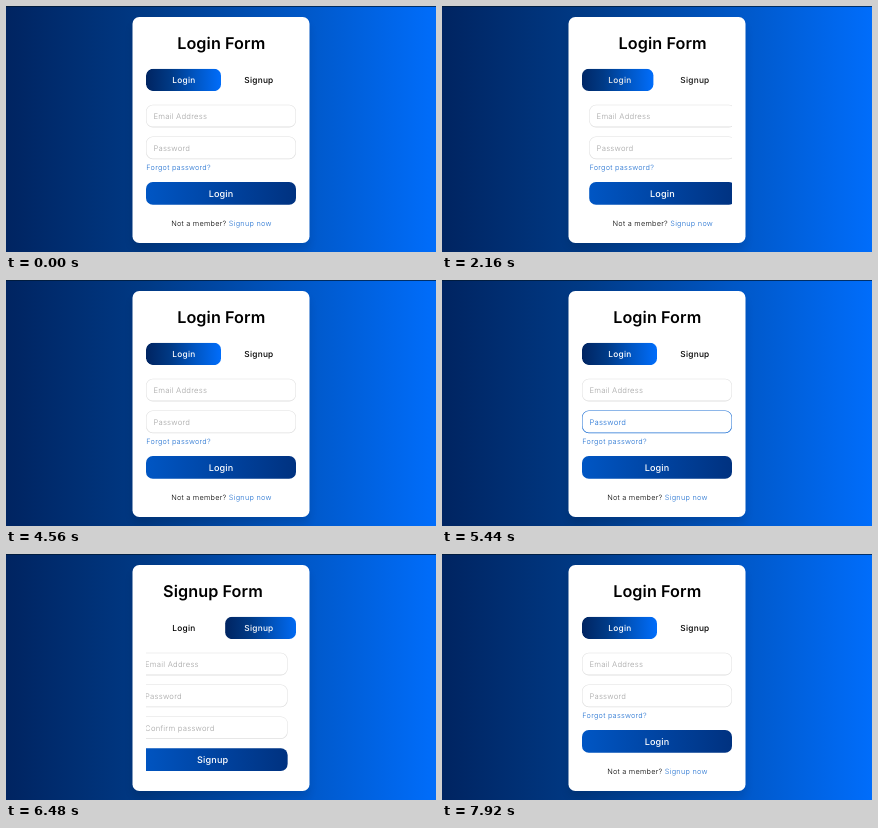
Animation of 430 by 246 pixels, one loop 8 s. Source, as an HTML page:

```html
<!DOCTYPE html>
<html lang="en">
<head>
<meta charset="utf-8">
<title>Login and signup form</title>
<style>
html, body { margin: 0; width: 100%; height: 100%; overflow: hidden; background: #003a86; }
svg { display: block; width: 100vw; height: 100vh; }
text { font-family: Inter, "Open Sans", sans-serif; text-rendering: geometricPrecision; }
.title { font-size: 16.2px; font-weight: 600; letter-spacing: .08px; }
.tab { font-size: 8.3px; font-weight: 500; letter-spacing: .25px; }
.button { font-size: 9.08px; font-weight: 500; letter-spacing: .15px; fill: #fff; }
.hint { font-size: 7.71px; font-weight: 300; letter-spacing: .23px; }
.small { font-size: 7.3px; font-weight: 300; letter-spacing: .26px; }
.link { fill: #1f6fd0; }
.mid { text-anchor: middle; }
</style>
</head>
<body>
<svg id="stage" viewBox="0 0 430 246" preserveAspectRatio="none">
  <defs>
    <linearGradient id="blue">
      <stop offset="0" stop-color="#002461"/>
      <stop offset=".333" stop-color="#003a86"/>
      <stop offset=".667" stop-color="#0056c4"/>
      <stop offset="1" stop-color="#006dfb"/>
    </linearGradient>
    <linearGradient id="deep">
      <stop offset="0" stop-color="#0056c4"/>
      <stop offset="1" stop-color="#003280"/>
    </linearGradient>
    <filter id="soft" x="-20%" y="-20%" width="140%" height="140%"><feGaussianBlur stdDeviation="4.5"/></filter>
    <clipPath id="cardClip"><rect x="126.5" y="11" width="177" height="226" rx="6.8"/></clipPath>
    <clipPath id="tabClip"><rect x="140" y="62.7" width="150" height="22.4" rx="6.8"/></clipPath>
    <clipPath id="formClip"><rect x="140" y="90" width="150" height="140"/></clipPath>
  </defs>
  <rect width="430" height="246" fill="url(#blue)"/>
  <rect width="430" height="1" fill="#00182e" opacity=".7"/>
  <rect x="126.5" y="17.8" width="177" height="226" rx="6.8" opacity=".1" filter="url(#soft)"/>
  <rect x="126.5" y="11" width="177" height="226" rx="6.8" fill="#fff"/>
  <g id="titles" clip-path="url(#cardClip)"></g>
  <g id="tabs" clip-path="url(#tabClip)"></g>
  <g clip-path="url(#formClip)"><g id="forms"></g></g>
</svg>
<script>
const LOOP = 8000, SLIDE = 600, FADE = 300;
const LEFT = 140, W = 150, H = 22.7;
const SWITCHES = [866, 1758, 5933, 7199];
const FOCUS = { email: [2760, 3660], password: [4600, 5740] };
const GREY = [165, 165, 165], BORDER = [224, 224, 224], BLUE = [30, 112, 212], TEAL = [44, 138, 180];
const byId = id => document.getElementById(id);

function add(parent, tag, attrs, content) {
  const el = document.createElementNS("http://www.w3.org/2000/svg", tag);
  set(el, attrs);
  if (content) el.textContent = content;
  parent.appendChild(el);
  return el;
}
function set(el, attrs) {
  for (const key in attrs) el.setAttribute(key, attrs[key]);
}

// CSS-style cubic-bezier timing, solved by bisection
function bezier(x1, y1, x2, y2) {
  const curve = (a, b, u) => 3 * (1 - u) * (1 - u) * u * a + 3 * (1 - u) * u * u * b + u * u * u;
  return x => {
    if (x <= 0) return 0;
    if (x >= 1) return 1;
    let lo = 0, hi = 1;
    for (let i = 0; i < 24; i++) {
      const u = (lo + hi) / 2;
      if (curve(x1, x2, u) < x) lo = u; else hi = u;
    }
    return curve(y1, y2, lo);
  };
}
const spring = bezier(.68, -.55, .265, 1.55);
const ease = bezier(.25, .1, .25, 1);

// Value that goes to 1 and back to 0 at alternating times
const toggle = (times, t, length, timing) =>
  times.reduce((sum, start, i) => sum + (i % 2 ? -1 : 1) * timing((t - start) / length), 0);
const mix = (a, b, k) => `rgb(${a.map((v, i) => Math.round(v + (b[i] - v) * k))})`;

function makeField(parent, y, label, hue) {
  const edge = add(parent, "path", { "fill-rule": "evenodd" });
  const hint = add(parent, "text", { class: "hint", x: 7.4, y: y + 14.3 }, label);
  const box = (x, top, w, h, r) => `M${x + r} ${top}h${w - 2 * r}a${r} ${r} 0 0 1 ${r} ${r}v${h - 2 * r}` +
    `a${r} ${r} 0 0 1 ${-r} ${r}h${2 * r - w}a${r} ${r} 0 0 1 ${-r} ${-r}v${2 * r - h}a${r} ${r} 0 0 1 ${r} ${-r}z`;
  return (w, focus) => {
    set(edge, {
      d: box(0, y, w, H, 6.8) + box(.5, y + .5, w - 1, H - 1.4, 6.3),
      fill: mix(BORDER, hue, focus)
    });
    set(hint, { fill: mix(GREY, BLUE, focus) });
  };
}
function makeButton(parent, y, label) {
  const face = add(parent, "rect", { y, height: H, rx: 6.8, fill: "url(#deep)" });
  const text = add(parent, "text", { class: "button mid", y: y + 14.6 }, label);
  return w => {
    set(face, { width: w });
    set(text, { x: w / 2 });
  };
}

const titles = ["Login Form", "Signup Form"].map(label =>
  add(byId("titles"), "text", { class: "title mid", y: 42.7 }, label));

const slider = add(byId("tabs"), "rect", { y: 62.7, width: W / 2, height: 22.4, rx: 6.8, fill: "url(#blue)" });
const tabs = ["Login", "Signup"].map((label, i) =>
  add(byId("tabs"), "text", { class: "tab mid", x: LEFT + .4 + W * (.25 + i / 2), y: 76.8 }, label));

const forms = [0, 1].map(() => add(byId("forms"), "g", {}));
const email = makeField(forms[0], 98.8, "Email Address", TEAL);
const password = makeField(forms[0], 130.6, "Password", BLUE);
add(forms[0], "text", { class: "small link", x: .3, y: 163.8 }, "Forgot password?");
const loginButton = makeButton(forms[0], 176, "Login");
const note = add(forms[0], "text", { class: "small mid", y: 220.4 }, "Not a member? ");
add(note, "tspan", { class: "link" }, "Signup now");

const blankFields = ["Email Address", "Password", "Confirm password"].map((label, i) =>
  makeField(forms[1], 98.8 + 31.8 * i, label, BLUE));
const signupButton = makeButton(forms[1], 194.2, "Signup");

function draw(t) {
  const p = toggle(SWITCHES, t, SLIDE, spring);
  const tint = toggle(SWITCHES, t, SLIDE, ease);
  // A positive margin squeezes both panels, as flex items shrink
  const margin = -W * p;
  const w = W - Math.max(margin, 0) / 2;

  [margin, margin + w].forEach((x, i) => {
    set(titles[i], { x: LEFT + .3 + x + w / 2 });
    set(forms[i], { transform: `translate(${LEFT + x} 0)` });
  });
  set(slider, { x: LEFT + W / 2 * p });
  set(tabs[0], { fill: mix([255, 255, 255], [0, 0, 0], tint) });
  set(tabs[1], { fill: mix([0, 0, 0], [255, 255, 255], tint) });

  email(w, toggle(FOCUS.email, t, FADE, ease));
  password(w, toggle(FOCUS.password, t, FADE, ease));
  blankFields.forEach(field => field(w, 0));
  loginButton(w);
  signupButton(w);
  set(note, { x: w / 2 + .4 });
}

const begin = performance.now();
function frame() {
  draw((performance.now() - begin) % LOOP);
  requestAnimationFrame(frame);
}
frame();
</script>
</body>
</html>
```
